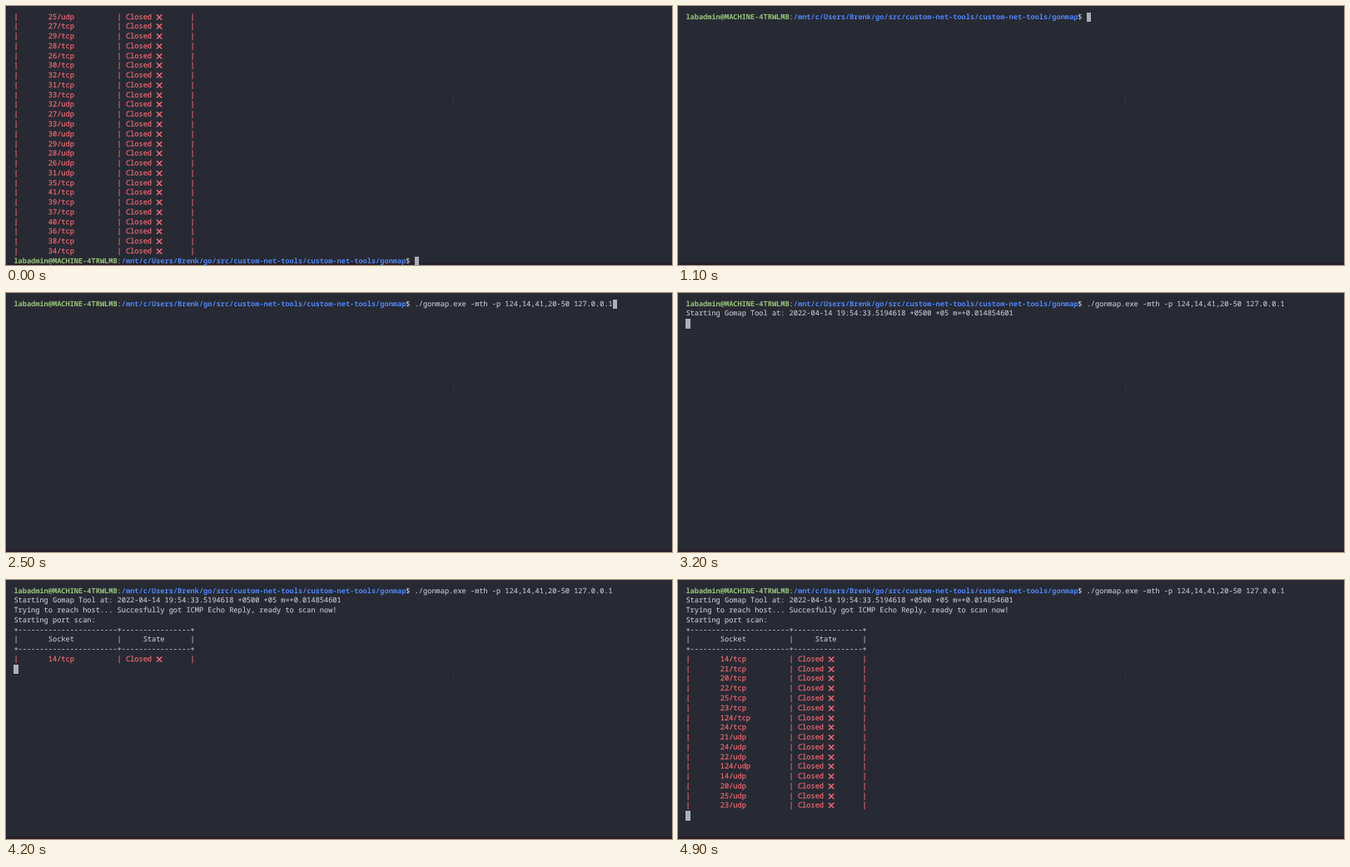
An HTML page for the animation above (5000 ms loop, 800 by 312 pixels).

```html
<!DOCTYPE html>
<html lang="en">
<head>
<meta charset="utf-8">
<title>Port scan in a terminal</title>
<style>
html, body { margin: 0; width: 100%; height: 100%; overflow: hidden; background: #272a33; }
body { position: relative; }
#edge { position: absolute; left: 0; top: 309px; width: 100%; height: 3px; background: #282029; }
#mouse { position: absolute; left: 536.5px; top: 107px; width: 1px; height: 8px; background: #363941; }
#term {
  position: absolute; left: 9.4px; top: 7.6px; margin: 0; color: #c3c6cc;
  font: 8.65px/11.77px "Noto Sans Mono", "DejaVu Sans Mono", monospace;
  text-rendering: geometricPrecision; font-variant-ligatures: none;
  -webkit-text-stroke: .12px;
}
b { -webkit-text-stroke: 0; }
.user { color: #98c379; }
.path { color: #4d84f7; }
.closed { color: #ea6570; -webkit-text-stroke: .25px; }
.cursor { display: inline-block; width: 5.2px; height: 11.5px; vertical-align: top; background: #abafba; }
svg { display: inline-block; width: 10.38px; height: 8px; vertical-align: -1px; margin: -1px 0; }
svg path { stroke: #ea6570; stroke-width: 1.5; stroke-linecap: round; }
</style>
</head>
<body>
<div id="edge"></div>
<div id="mouse"></div>
<pre id="term"></pre>
<script>
const term = document.getElementById("term");
const cursor = '<span class="cursor"></span>';
const cross = '<svg viewBox="0 0 10.38 8"><path d="M1.4 .9L6.8 6.3M6.8 .9L1.4 6.3"/></svg>';
const prompt = '<b class="user">labadmin@MACHINE-4TRWLMB</b>:' +
  '<b class="path">/mnt/c/Users/Brenk/go/src/custom-net-tools/custom-net-tools/gonmap</b>$ ';
const command = "./gonmap.exe -mth -p 124,14,41,20-50 127.0.0.1";

const row = port => `<span class="closed">|       ${port.padEnd(16)}| Closed ${cross}      |</span>`;
const rows = (ports, proto) => ports.split(" ").map(p => row(p + "/" + proto));

const history = [
  ...rows("25", "udp"),
  ...rows("27 29 28 26 30 32 31 33", "tcp"),
  ...rows("32 27 33 30 29 28 26 31", "udp"),
  ...rows("35 41 39 37 40 36 38 34", "tcp")
];
const results = [
  ...rows("14 21 20 22 25 23 124 24", "tcp"),
  ...rows("21 24 22 124 14 20 25 23", "udp")
];

const rule = "+" + "-".repeat(23) + "+" + "-".repeat(16) + "+";
const started = "Starting Gomap Tool at: 2022-04-14 19:54:33.5194618 +0500 +05 m=+0.014854601";
const header = [
  "Trying to reach host... Succesfully got ICMP Echo Reply, ready to scan now!",
  "Starting port scan:",
  rule,
  "|       Socket          |     State      |",
  rule
];

// Latest value whose start time has passed
const at = (t, steps) => steps.reduce((v, [start, value]) => t >= start ? value : v, steps[0][1]);

function screen(t) {
  if (t < 1100) {
    const typed = at(t, [[0, 0], [600, 1], [800, 3], [900, 4], [1000, 5]]);
    return [...history, prompt + "clear".slice(0, typed)];
  }
  if (t < 2800) return [prompt + at(t, [[1100, ""], [1300, "clear"], [1400, command]])];
  const lines = [prompt + command];
  if (t >= 3200) lines.push(started);
  if (t >= 3300) lines.push(...header);
  const found = at(t, [[0, 0], [4200, 1], [4300, 8], [4700, 16]]);
  return [...lines, ...results.slice(0, found), ""];
}

let shown = "";
function draw(now) {
  const html = screen(now % 5000).join("\n") + cursor;
  if (html !== shown) term.innerHTML = shown = html;
  requestAnimationFrame(draw);
}
draw(performance.now());
</script>
</body>
</html>
```
